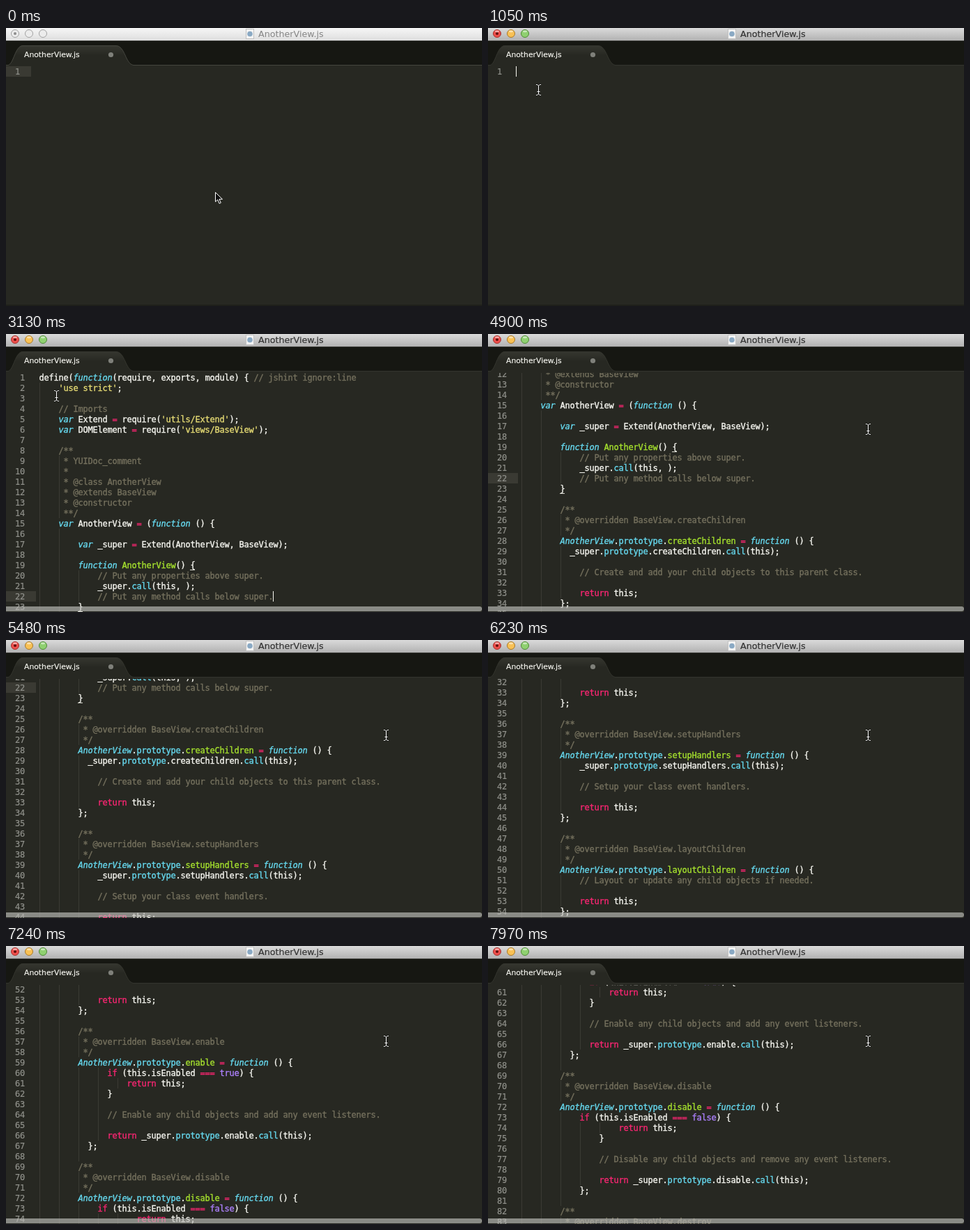
Write an HTML page that moves like this. It is 683 px wide and 400 px high and loops after 8 s.

```html
<!DOCTYPE html>
<html lang="en">
<head>
<meta charset="utf-8">
<title>Editor snippet</title>
<style>
  html, body { margin: 0; width: 100%; height: 100%; overflow: hidden; background: #272822; }
  #stage { position: absolute; left: 0; top: 0; width: 683px; height: 400px; overflow: hidden; background: #272822; }
  #stage > *, .abs { position: absolute; }
  .mono, .line {
    font: 12px/15px "DejaVu Sans Mono", "Liberation Mono", monospace;
    letter-spacing: calc(7px - 1ch); white-space: pre; color: #f8f8f2;
    -webkit-text-stroke: .35px;
  }
  svg { left: 0; top: 0; overflow: visible; }
  svg text { font-family: "DejaVu Sans", "Open Sans", sans-serif; stroke-width: .2px; }
  #view { left: 0; top: 56px; width: 683px; height: 344px; overflow: hidden; }
  #code { left: 0; top: -1px; width: 683px; }
  .line { position: relative; box-sizing: border-box; height: 15px; padding: 1px 0 0 47.5px; }
  .num { position: absolute; left: 0; width: 27px; text-align: right; color: #8f908a; -webkit-text-stroke: .2px; }
  .guide { position: absolute; top: 0; width: 1px; height: 15px; background: #3b3b34; }
  .under { position: absolute; top: 14px; width: 7px; height: 1px; background: #d8d8d0; }
  .row { position: absolute; left: 0; top: 0; width: 43px; height: 15px; background: #3a3a33; }
  .caret { top: 0; width: 1px; height: 15px; background: #f8f8f0; }
  .c { color: #75715e } .s { color: #e6db74 } .i { color: #66d9ef; font-style: italic }
  .g { color: #a6e22e } .b { color: #66d9ef } .k { color: #f92672 } .p { color: #ae81ff }
  #popup { left: 40px; top: 72px; width: 315px; overflow: hidden; background: #33342d; }
  #popup div { height: 18px; line-height: 18px; padding-left: 2px; }
  #popup div:first-child { background: #49483e; }
  .active { display: none; }
  .on .active { display: inline; }
  .on .idle { display: none; }
</style>
</head>
<body>
<div id="stage">
  <div id="blank">
    <div id="firstRow" class="row" style="top:55px;width:36px"></div>
    <div class="mono abs" style="left:13px;top:56px;color:#8f908a;-webkit-text-stroke:.2px">1</div>
    <div id="typed" class="mono abs" style="left:40px;top:56px"></div>
    <div id="popup" class="mono abs"><div>view	View Class</div><div>viewport	View Port</div><div>void</div></div>
    <div id="caret" class="caret abs" style="top:55px"></div>
    <div class="abs" style="top:398px;width:683px;height:2px;background:#1f201b"></div>
  </div>
  <div id="view">
    <div id="code" class="abs"></div>
    <div class="abs" style="left:0;top:336px;width:683px;height:7px;border-radius:0 4px 4px 0;background:rgba(190,190,186,.66)"></div>
  </div>
  <svg id="chrome" width="683" height="400">
    <defs>
      <linearGradient id="barIdle" x2="0" y2="1"><stop stop-color="#f6f6f6"/><stop offset="1" stop-color="#dedede"/></linearGradient>
      <linearGradient id="barOn" x2="0" y2="1"><stop stop-color="#dadada"/><stop offset="1" stop-color="#b2b2b2"/></linearGradient>
      <linearGradient id="tabFill" x2="0" y2="1"><stop stop-color="#35362f"/><stop offset=".5" stop-color="#272822"/></linearGradient>
    </defs>
    <rect width="683" height="18" fill="url(#barIdle)"/>
    <rect class="active" width="683" height="18" fill="url(#barOn)"/>
    <rect y="18" width="683" height="35" fill="#161712"/>
    <rect y="18" width="683" height="1" fill="#3a3b37"/>
    <path d="M3 53.5C11 52 13 25.500 24 25.500H158C171 25.500 171 52 183 53.500Z" fill="url(#tabFill)"/>
    <path class="idle" d="M0 53.500H3C11 52 13 25.500 24 25.500H158C171 25.500 171 52 183 53.500H683" fill="none" stroke="#45463f"/>
    <path class="active" d="M0 53.500H3C11 52 13 25.500 24 25.500H158C171 25.500 171 52 183 53.500H683" fill="none" stroke="#34352e"/>
    <text x="26" y="42" font-size="10.8" fill="#f2f2ec" stroke="#f2f2ec">AnotherView.js</text>
    <circle cx="150.5" cy="38.500" r="3.600" fill="#7f807a"/>
    <g class="idle">
      <g fill="#ececec" stroke="#a2a2a2"><circle cx="13" cy="8" r="5.500"/><circle cx="33" cy="8" r="5.500"/><circle cx="53" cy="8" r="5.500"/></g>
      <circle cx="13" cy="8" r="2" fill="#8c8c8c"/>
    </g>
    <g class="active">
      <circle cx="13" cy="8" r="5.500" fill="#ee4f4b" stroke="#a5332f"/>
      <circle cx="33" cy="8" r="5.500" fill="#f8c155" stroke="#a97a2a"/>
      <circle cx="53" cy="8" r="5.500" fill="#8fd070" stroke="#4f8a38"/>
      <circle cx="13" cy="8" r="2" fill="#5e0f0d"/>
      <g fill="#fff" opacity=".5"><ellipse cx="13" cy="4.800" rx="3" ry="1.500"/><ellipse cx="33" cy="4.800" rx="3" ry="1.500"/><ellipse cx="53" cy="4.800" rx="3" ry="1.500"/></g>
    </g>
    <rect x="344.500" y="1.500" width="11" height="14" fill="#f3f3f3" stroke="#c2c2c2"/>
    <circle cx="350" cy="8.500" r="3.800" fill="#8aa9c4"/>
    <text class="idle" x="362" y="12.500" font-size="12.7" fill="#858585">AnotherView.js</text>
    <text class="active" x="362" y="12.500" font-size="12.7" fill="#333" stroke="#333">AnotherView.js</text>
  </svg>
  <svg id="mouse" width="20" height="20">
    <path id="arrow" d="M.5 .5V14L3.700 11L6 16.500L8.300 15.500L6 10.300H10.500Z" fill="#111" stroke="#fff"/>
    <g id="beam" fill="none">
      <path d="M-3 -7.500H-1.500L.5 -6L2.500 -7.500H4M.5 -6V6M-1.500 2.500H2.500M-3 7.500H-1.500L.5 6L2.500 7.500H4" stroke="#111" stroke-width="2.500" opacity=".5"/>
      <path d="M-3 -7.500H-1.500L.5 -6L2.500 -7.500H4M.5 -6V6M-1.500 2.500H2.500M-3 7.500H-1.500L.5 6L2.500 7.500H4" stroke="#fff"/>
    </g>
  </svg>
</div>
<script>
const LOOP = 8000, LEFT = 47, CH = 7;
const $ = id => document.getElementById(id);

const doc = (col, name) => [col, '/**', col + 1, '* @overridden BaseView.' + name, col + 1, '*/'];
const method = name => [...doc(8, name), 8, `AnotherView.prototype.${name} = function () {`];
const gap = [0, ''];

// Alternating indent and text.
const source = [
  0, 'define(function(require, exports, module) { // jshint ignore:line',
  4, "'use strict';", ...gap,
  4, '// Imports',
  4, "var Extend = require('utils/Extend');",
  4, "var DOMElement = require('views/BaseView');", ...gap,
  4, '/**', 5, '* YUIDoc_comment', 5, '*', 5, '* @class AnotherView',
  5, '* @extends BaseView', 5, '* @constructor', 5, '**/',
  4, 'var AnotherView = (function () {', ...gap,
  8, 'var _super = Extend(AnotherView, BaseView);', ...gap,
  8, 'function AnotherView() {',
  12, '// Put any properties above super.',
  12, '_super.call(this, );',
  12, '// Put any method calls below super.',
  8, '}', ...gap,
  ...method('createChildren'),
  10, '_super.prototype.createChildren.call(this);', ...gap,
  12, '// Create and add your child objects to this parent class.', ...gap,
  12, 'return this;', 8, '};', ...gap,
  ...method('setupHandlers'),
  12, '_super.prototype.setupHandlers.call(this);', ...gap,
  12, '// Setup your class event handlers.', ...gap,
  12, 'return this;', 8, '};', ...gap,
  ...method('layoutChildren'),
  12, '// Layout or update any child objects if needed.', ...gap,
  12, 'return this;', 8, '};', ...gap,
  ...method('enable'),
  14, 'if (this.isEnabled === true) {', 18, 'return this;', 14, '}', ...gap,
  14, '// Enable any child objects and add any event listeners.', ...gap,
  14, 'return _super.prototype.enable.call(this);', 10, '};', ...gap,
  ...method('disable'),
  12, 'if (this.isEnabled === false) {', 20, 'return this;', 16, '}', ...gap,
  16, '// Disable any child objects and remove any event listeners.', ...gap,
  16, 'return _super.prototype.disable.call(this);', 12, '};', ...gap,
  ...doc(8, 'destroy')
];

const lines = [];
for (let i = 0; i < source.length; i += 2) lines.push({ col: source[i], text: source[i + 1] });

const TOKENS = /(\/\/.*|^\/?\*.*)|('[^']*')|(AnotherView(?=\.prototype)|\b(?:function|var)\b)|((?<=function )AnotherView|(?<=prototype\.)\w+(?= =))|\b(prototype|call)\b|(===|=|\breturn\b|\bif\b)|\b(true|false)\b/g;
const CLASSES = 'csigbkp';
const paint = text => text.replace(TOKENS, (m, ...groups) =>
  `<span class="${CLASSES[groups.findIndex(g => g !== undefined)]}">${m}</span>`);

const indent = i => {
  if (lines[i].text) return lines[i].col;
  return Math.max(lines[i - 1].col, lines[i + 1].col);
};
const underline = col => `<i class="under" style="left:${LEFT + col * CH}px"></i>`;

$('code').innerHTML = lines.map(({ col, text }, i) => {
  const n = i + 1;
  let extra = n === 22 ? '<i class="row"></i>' : '';
  for (let c = 0; c < indent(i); c += 4) extra += `<i class="guide" style="left:${LEFT + 1 + c * CH}px"></i>`;
  if (n === 19) extra += underline(31);
  if (n === 23) extra += underline(8);
  if (n === 22) extra += `<i id="caret2" class="caret abs" style="left:${LEFT + (col + text.length) * CH}px"></i>`;
  return `<div class="line">${extra}<span class="num">${n}</span>${' '.repeat(col)}${paint(text)}</div>`;
}).join('');

// Step tables: [time, value...]; a value holds until the next time.
const ARROW = [[0, 300, 236], [150, 264, 219], [300, 182, 166], [450, 108, 114], [600, 74, 91], [750, 62, 84]];
const BEAM = [[1050, 72, 89], [3570, 92, 85], [3720, 196, 80], [3870, 340, 90],
  [4010, 466, 114], [4160, 528, 131], [4310, 545, 137]];
const CARET = [[0, 0], [1050, 1], [1350, .6], [1490, .25], [1640, 0], [1940, 1], [2680, .5], [2830, 0],
  [3130, 1], [3570, .5], [3720, 0], [4010, .5], [4160, 1], [4600, .4], [4750, 0]];
const TYPED = [[0, ''], [1940, 'v'], [2090, 'vi'], [2230, 'view']];
const POPUP_ROWS = { v: 3, vi: 2, view: 1 };

// Scroll offset after each tick, eased between swipes.
const SCROLL = [[0, 0], [1, 45], [2, 112], [3, 170], [5, 250], [8, 338], [12, 467], [19, 765], [21, 829], [24, 896]];
const SCROLL_START = 4595, TICK = 146.5;

const at = (table, t) => table.filter(step => step[0] <= t).pop();

function scrollAt(t) {
  const tick = t < SCROLL_START ? 0 : Math.min(24, Math.floor((t - SCROLL_START) / TICK) + 1);
  const k = Math.max(1, SCROLL.findIndex(s => s[0] >= tick));
  const [a, from] = SCROLL[k - 1], [b, to] = SCROLL[k];
  return Math.round(from + (to - from) * (tick - a) / (b - a));
}

function render(t) {
  const active = t >= 1050, expanded = t >= 3130;
  $('stage').classList.toggle('on', active);
  $('blank').style.display = expanded ? 'none' : '';
  $('view').style.display = expanded ? '' : 'none';
  $('firstRow').style.display = active ? 'none' : '';

  const typed = at(TYPED, t)[1], rows = POPUP_ROWS[typed] || 0;
  $('typed').textContent = typed;
  $('popup').style.height = (rows === 3 ? 56 : rows * 18) + 'px';
  $('caret').style.left = 40 + typed.length * CH + 'px';
  $('caret').style.opacity = $('caret2').style.opacity = at(CARET, t)[1];
  $('code').style.transform = `translateY(${-scrollAt(t)}px)`;

  const [, x, y] = at(active ? BEAM : ARROW, t);
  $('mouse').style.transform = `translate(${x}px,${y}px)`;
  $('arrow').style.display = active ? 'none' : '';
  $('beam').style.display = active ? '' : 'none';
}

const start = performance.now();
function frame() {
  render((performance.now() - start) % LOOP);
  requestAnimationFrame(frame);
}
frame();
</script>
</body>
</html>
```
